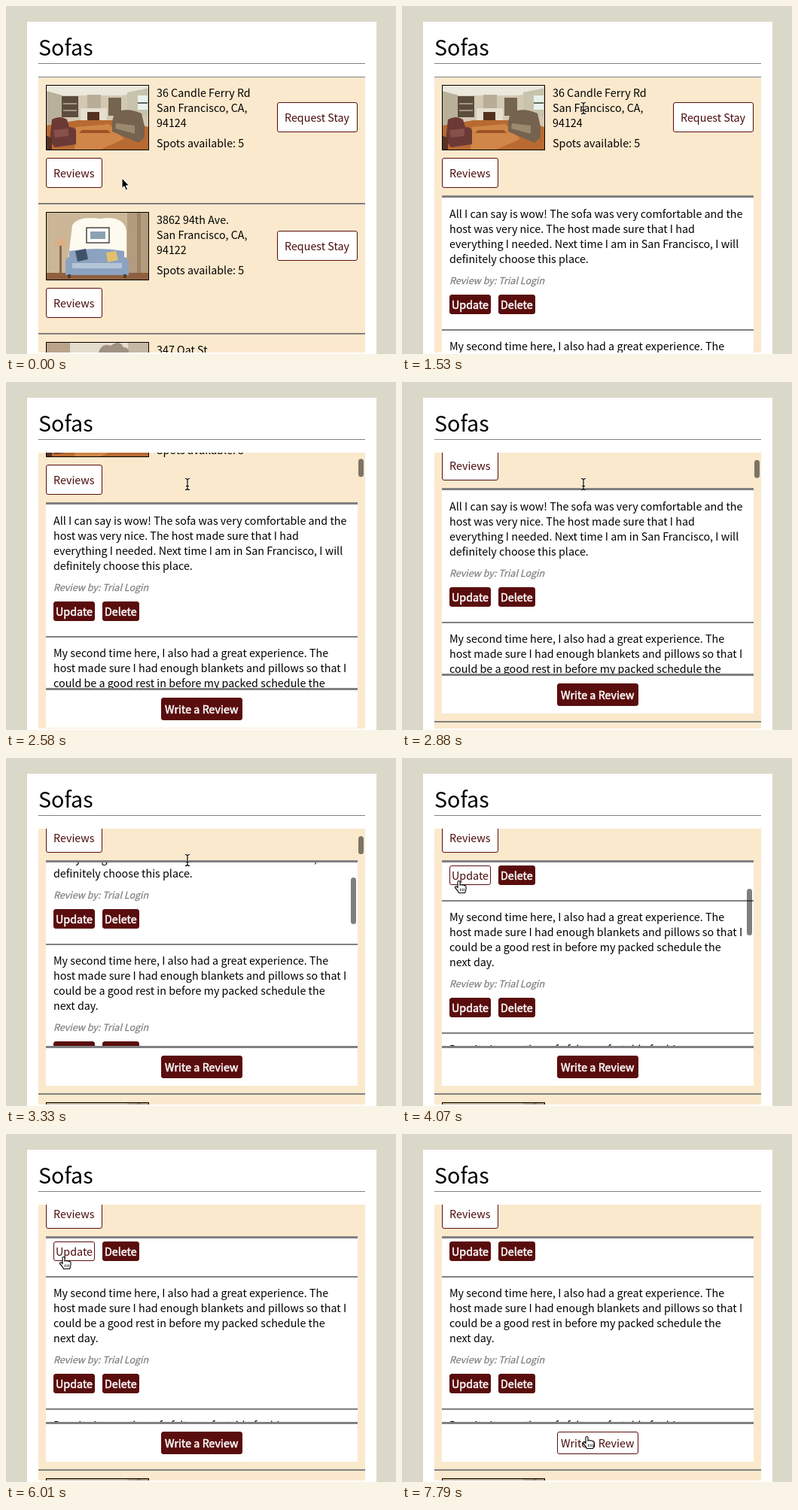
An HTML page for the animation above (8000 ms loop, 518 by 463 pixels).

```html
<!DOCTYPE html>
<html lang="en">
<head>
<meta charset="utf-8">
<title>Sofas</title>
<style>
html, body { margin: 0; width: 100%; height: 100%; overflow: hidden; background: #dad9c9; }
#stage { display: block; width: 518px; height: 463px; }
/* These sizes give the Latin glyphs 16, 32 and 14 px proportions. */
text { font: 14.32px "Noto Sans CJK JP", "Noto Sans CJK SC", "Noto Sans CJK", "Open Sans", sans-serif; white-space: pre; }
text.title { font-size: 28.65px; }
text.author { font-size: 12.54px; font-style: italic; fill: #808080; stroke: #808080; stroke-width: .25; }
.btn rect { fill: #fff; stroke: #5a0d0d; }
.btn text { fill: #4a0a0a; }
.btn.filled rect { fill: #5a0d0d; }
.btn.filled text { fill: #fff; stroke: #fff; stroke-width: .5; }
</style>
</head>
<body>
<svg id="stage" viewBox="0 0 518 463"></svg>
<script>
const LOOP = 8000, STEP = 148.78, FIRST = 500;
const GRAY = '#808080';

const rect = (x, y, w, h, fill, more = '') =>
  `<rect x="${x}" y="${y}" width="${w}" height="${h}" fill="${fill}" ${more}/>`;
const path = (d, fill, more = '') => `<path d="${d}" fill="${fill}" ${more}/>`;
const text = (x, y, s, cls = '') => `<text x="${x}" y="${y}" class="${cls}">${s}</text>`;
const clip = (x, y, w, h, body) =>
  `<svg x="${x}" y="${y}" width="${w}" height="${h}" viewBox="${x} ${y} ${w} ${h}">${body}</svg>`;
const button = (x, y, w, h, label, pad, base, filled, id = '') =>
  `<g class="btn ${filled ? 'filled' : ''}" id="${id}">` +
  rect(x + .5, y + .5, w - 1, h - 1, '', 'rx="2.5"') + text(x + pad, y + base, label) + '</g>';

// Photos, drawn in a box 137 wide
const fireplaceRoom =
  rect(0, 0, 137, 87, '#d3c9b2') +
  path('M0 0H137V9L100 14H22L0 8Z', '#ebe8dc') +
  path('M0 8L22 14V47L0 54Z', '#b9b09a') +
  rect(21, 15, 22, 28, '#5b4c3e') + rect(23, 24, 18, 2, '#a39680') + rect(23, 33, 18, 2, '#a39680') +
  rect(55, 13, 18, 18, '#b8ae98') + rect(46, 31, 35, 20, '#e6dfcf') + rect(55, 36, 16, 15, '#54301f') +
  rect(83, 17, 17, 24, '#75654f') +
  path('M108 10L137 4V42H108Z', '#c8c3ad') + rect(122, 14, 13, 19, '#e9f2ec') + rect(122, 23, 13, 2, '#5d6b5a') +
  path('M0 54L42 47H96L137 56V87H0Z', '#b86a32') +
  path('M40 56L84 52L104 72L70 87H38Z', '#cf8647') +
  path('M48 60H82L86 64H44Z', '#9c5224') +
  path('M8 46Q19 40 28 46L31 56Q41 56 40 64V79L12 83L5 74Z', '#6b3936') +
  path('M10 60L30 58V68L12 70Z', '#87504a') +
  path('M91 37Q108 29 127 38L131 55V70L123 77L88 62V49Z', '#75624f') +
  path('M93 51L118 54V65L92 58Z', '#9b8970') +
  path('M0 67L8 71V87H0Z', '#593225');

const blueSofaRoom =
  rect(0, 0, 137, 91, '#cbb798') +
  path('M108 0H137V91H108Z', '#b39b7d') + rect(121, 0, 5, 82, '#9c8468') +
  path('M35 18Q42 5 72 9Q103 4 107 25V60H30Z', '#fdfaf0') +
  rect(0, 81, 137, 10, '#8f6040') +
  rect(54, 21, 30, 20, '#fff', 'stroke="#4b4540" stroke-width="1.5"') + rect(59, 26, 20, 10, '#8ba2b2') +
  path('M15 36H25L28 45H11Z', '#dbae83') + rect(18, 45, 3, 38, '#8a6549') +
  path('M31 52Q68 46 104 52V61Q110 61 110 67V84H26V67Q26 61 31 60Z', '#8ba2c0') +
  path('M35 68H101V75H35Z', '#b5c5d8') + rect(29, 83, 4, 5, '#51402f') + rect(103, 83, 4, 5, '#51402f') +
  path('M39 52L53 49L56 63L42 66Z', '#3f5269') + path('M80 54L93 52L96 64L82 67Z', '#e3c06f');

const flowerRoom =
  rect(0, 0, 137, 90, '#e4dccd') + rect(0, 0, 32, 90, '#baa489') + rect(109, 0, 28, 90, '#c5b8a4') +
  path('M70 14Q74 1 86 5Q98 -4 103 7Q113 7 109 20H70Z', '#9f9282');

function sofa(top, height, address, photo, id) {
  const lines = address.map((line, i) => text(200, top + 16 + 20 * i, line)).join('');
  return clip(53, top, 137, height, `<g transform="translate(53 ${top})">${photo}</g>`) +
    rect(53.5, top + .5, 136, height - 1, 'none', 'stroke="#000"') +
    lines + text(200, top + 83, 'Spots available: 5') +
    button(360, Math.floor(top + height / 2 - 20), 107, 40, 'Request Stay', 10, 26) +
    button(53, top + height + 10, 75, 40, 'Reviews', 10, 26, false, id);
}
const divider = y => rect(43, y, 434, 2, GRAY);

function review(index, lines) {
  const y = 176 * index;
  return lines.map((line, i) => text(63, y + 282 + 20 * i, line)).join('') +
    text(63, y + 370, 'Review by: Trial Login', 'author') +
    button(63, y + 384, 55, 26, 'Update', 3, 19, true, 'update' + index) +
    button(128, y + 384, 49, 26, 'Delete', 3, 19, true) +
    rect(53, y + 430, 414, 2, GRAY);
}

const reviews = [
  ['All I can say is wow! The sofa was very comfortable and the',
   'host was very nice. The host made sure that I had',
   'everything I needed. Next time I am in San Francisco, I will',
   'definitely choose this place.'],
  ['My second time here, I also had a great experience. The',
   'host made sure I had enough blankets and pillows so that I',
   'could be a good rest in before my packed schedule the',
   'next day.'],
  ['Despite its age the sofa felt comfortable for him']
];

const panel = '<g id="panel">' +
  rect(53, 252, 414, 300, '#fff') + rect(53, 252, 414, 3, GRAY) +
  clip(53, 255, 414, 244, `<g id="reviews">${reviews.map((r, i) => review(i, r)).join('')}</g>`) +
  rect(53, 499, 414, 3, GRAY) +
  button(206, 512, 108, 30, 'Write a Review', 5, 21, true, 'write') + '</g>';

const list = '<g id="list">' + rect(43, 94, 434, 1, GRAY) +
  sofa(105, 87, ['36 Candle Ferry Rd', 'San Francisco, CA,', '94124'], fireplaceRoom, 'toggle') + panel +
  '<g id="rest">' + divider(262) +
  sofa(274, 91, ['3862 94th Ave.', 'San Francisco, CA,', '94122'], blueSofaRoom) + divider(435) +
  sofa(447, 90, ['347 Oat St', 'San Francisco, CA,', '94131'], flowerRoom) + '</g></g>';

const beam = 'M-3 -7.5Q0 -7.5 0 -5.5V5.5Q0 7.5 -3 7.5M3 -7.5Q0 -7.5 0 -5.5M0 5.5Q0 7.5 3 7.5M-2 2.5H2';
const cursors = {
  arrow: path('M0 0V13.5L3 10.8L5.3 16L7.6 15L5.3 10H9.5Z', '#000', 'stroke="#fff"'),
  beam: path(beam, 'none', 'stroke="#fff" stroke-width="2.4" opacity=".7"') + path(beam, 'none', 'stroke="#000" stroke-width="1.2"'),
  hand: path('M-2 1.5Q-.5 -1 1 1.5V6Q2.7 4.4 4 6.2Q5.7 5 6.8 6.8Q9 6 9 8.5V11Q8.8 14 7.5 16.5H-.5Q-1.5 13.5 -5.5 9.5Q-5.5 7 -3.5 8L-2 9.5Z',
    '#fff', 'stroke="#000" stroke-width="1.1"') + path('M1.5 10.5V14M4 10.5V14M6.3 10.5V14', 'none', 'stroke="#000" stroke-width=".8"')
};

const stage = document.getElementById('stage');
stage.innerHTML =
  rect(28, 21, 464, 442, '#fff') + text(43, 66, 'Sofas', 'title') + rect(43, 76, 434, 1, GRAY) +
  rect(43, 94, 434, 367, '#fbe9cd') + clip(43, 94, 434, 367, list) +
  rect(468, 0, 7, 24, '#000', 'rx="3.5" id="outerBar"') +
  rect(458, 0, 7, 62, '#000', 'rx="3.5" id="innerBar"') +
  '<g id="cursor">' + Object.keys(cursors).map(k => `<g id="${k}">${cursors[k]}</g>`).join('') + '</g>';

const el = id => document.getElementById(id);

// Linear keyframes: [time, value]
function track(keys, t) {
  const next = keys.findIndex(k => k[0] > t);
  if (next === 0) return keys[0][1];
  if (next < 0) return keys[keys.length - 1][1];
  const [t0, a] = keys[next - 1], [t1, b] = keys[next];
  return a + (b - a) * (t - t0) / (t1 - t0);
}

const outerScroll = [[1988, 0], [2137, 10], [2435, 68], [2583, 92], [2732, 106], [3029, 116]];
const innerScroll = [[3029, 0], [3178, 28], [3327, 67], [3476, 100], [3624, 118], [3773, 125]];
const outerFade = [[1990, 0], [2130, .5], [3340, .5], [3773, 0]];
const innerFade = [[3030, 0], [3170, .5], [4368, .5], [4815, 0]];

// [time, x, y, shape]; the shape holds until the next entry
const pointer = [
  [0, 154, 229, 'arrow'], [351, 154, 229, 'arrow'], [640, 100, 224, 'hand'], [797, 92, 222, 'hand'],
  [1100, 92, 222, 'arrow'], [1541, 241, 136, 'beam'], [3630, 241, 136, 'beam'], [3920, 100, 159, 'hand'],
  [4060, 76, 163, 'hand'], [6000, 76, 163, 'hand'], [6001, 77, 163, 'hand'], [6601, 77, 163, 'hand'],
  [6749, 88, 168, 'hand'], [6890, 125, 215, 'beam'], [7493, 228, 380, 'beam'], [7641, 242, 400, 'hand'], [7780, 246, 402, 'hand']
];
const pointerX = pointer.map(k => [k[0], k[1]]), pointerY = pointer.map(k => [k[0], k[2]]);

const move = (id, x, y) => el(id).setAttribute('transform', `translate(${x} ${y})`);
const show = (id, on) => el(id).style.display = on ? '' : 'none';
const fill = (id, on) => el(id).classList.toggle('filled', on);

function draw(time) {
  const t = FIRST + STEP * Math.floor((time - FIRST + 12) / STEP);
  const open = t > 790;
  const outer = Math.round(track(outerScroll, t)), inner = Math.round(track(innerScroll, t));

  show('panel', open);
  move('rest', 0, open ? 300 : 0);
  move('list', 0, -outer);
  move('reviews', 0, -inner);
  el('outerBar').setAttribute('y', 95 + .078 * outer);
  el('innerBar').setAttribute('y', 141.7 + .2586 * inner);
  el('outerBar').setAttribute('opacity', track(outerFade, t));
  el('innerBar').setAttribute('opacity', track(innerFade, t));

  fill('toggle', t > 640 && t < 1100);
  fill('update0', t < 3920 || t > 6800);
  fill('write', t < 7640);

  const shape = pointer.filter(k => k[0] <= Math.max(t, 0)).pop()[3];
  for (const name in cursors) show(name, name === shape);
  move('cursor', Math.round(track(pointerX, t)), Math.round(track(pointerY, t)));
}

function tick(now) {
  draw(now % LOOP);
  requestAnimationFrame(tick);
}
draw(0);
requestAnimationFrame(tick);
</script>
</body>
</html>
```
